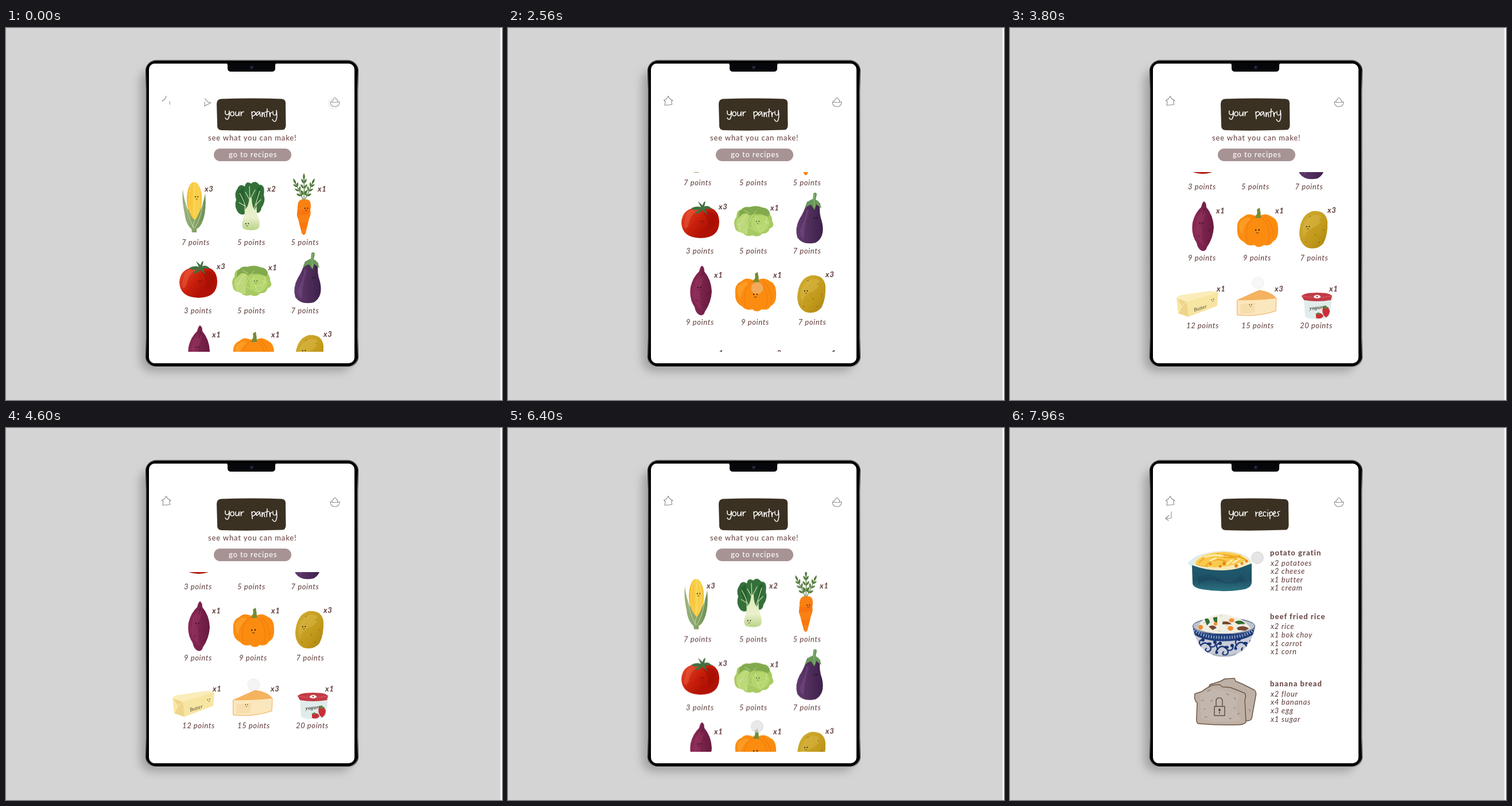
Write an HTML page that moves like this. It is 864 px wide and 648 px high and loops after 8000 ms.

```html
<!DOCTYPE html>
<html lang="en">
<head>
<meta charset="utf-8">
<title>Pantry app</title>
<style>
html, body { margin: 0; width: 100%; height: 100%; overflow: hidden; background: #d4d4d4; }
svg { display: block; width: 100%; height: 100%; }
text { font: 500 13px Lato, sans-serif; fill: #6b4a48; letter-spacing: .85px; }
.points text { font-style: italic; letter-spacing: .6px; }
.counts text { font: italic 800 13px Lato, sans-serif; letter-spacing: .9px; }
.title { font-weight: 800; letter-spacing: 1.05px; }
.items text { font-style: italic; letter-spacing: .72px; }
.script { font: italic 9px "Liberation Serif", serif; fill: #4a4136; letter-spacing: .2px; }
.line { fill: none; stroke-linecap: round; stroke-linejoin: round; }
.icon { stroke: #8b8b8b; stroke-width: 1.1; }
.hand { stroke: #fff; stroke-width: 1.5; }

.list, .cursor, .pantry, .recipes, .home, .hint { animation: 8s linear infinite; }
.list { animation-name: scroll; }
.cursor { animation-name: move; }
.pantry { animation-name: leave; }
.recipes { animation-name: enter; }
.home { animation-name: settle; }
.hint { animation-name: clear; }

@keyframes scroll {
  0%, 18.6% { transform: translateY(0); }
  21% { transform: translateY(-24px); }
  24% { transform: translateY(-70px); }
  27% { transform: translateY(-95px); }
  30%, 33.5% { transform: translateY(-104px); }
  38% { transform: translateY(-170px); }
  42% { transform: translateY(-207px); }
  46%, 64% { transform: translateY(-216px); }
  67.5% { transform: translateY(-179px); }
  70% { transform: translateY(-150px); }
  74% { transform: translateY(-115px); }
  77.5% { transform: translateY(-34px); }
  80% { transform: translateY(-5.5px); }
  83%, 100% { transform: translateY(0); }
}
@keyframes move {
  0% { transform: translate(571px, 131px); opacity: .28; }
  11% { transform: translate(569px, 137px); opacity: .28; animation-timing-function: ease-in-out; }
  17%, 18.6% { transform: translate(445px, 427px); opacity: .8; }
  21% { transform: translate(445px, 402px); opacity: .8; }
  24% { transform: translate(441px, 368px); opacity: .6; animation-timing-function: ease-in-out; }
  32%, 33.5% { transform: translate(434px, 453px); opacity: .4; }
  38% { transform: translate(433px, 387px); opacity: .75; animation-timing-function: ease-in-out; }
  47.5% { transform: translate(432px, 444px); opacity: .28; }
  64% { transform: translate(431px, 449px); opacity: .5; }
  67.5% { transform: translate(431px, 486px); opacity: .95; }
  71% { transform: translate(432px, 521px); opacity: .9; }
  80% { transform: translate(434px, 520px); opacity: .8; animation-timing-function: ease-in-out; }
  93.5% { transform: translate(431px, 226px); opacity: .5; }
  95%, 100% { transform: translate(431px, 226px); opacity: .95; }
}
@keyframes leave { 0%, 95% { opacity: 1; } 97.5%, 100% { opacity: 0; } }
@keyframes enter { 0%, 95% { opacity: 0; } 97.5%, 100% { opacity: 1; } }
@keyframes settle { 0% { opacity: 0; animation-timing-function: step-end; } .5%, 100% { opacity: 1; } }
@keyframes clear { 0% { opacity: 1; animation-timing-function: step-end; } .5%, 100% { opacity: 0; } }
</style>
</head>
<body>
<svg viewBox="0 0 864 648">
<defs>
  <clipPath id="window"><rect x="249" y="251" width="358" height="313"/></clipPath>
  <clipPath id="bowl"><path d="M318 345Q327 398 372 398T427 345Q424 359 372 359T318 345Z"/></clipPath>
  <filter id="soft" x="-20%" y="-20%" width="140%" height="140%"><feGaussianBlur stdDeviation="8"/></filter>
  <linearGradient id="metal" x2="0" y2="1">
    <stop stop-color="#777"/><stop offset=".03" stop-color="#222"/><stop offset=".1" stop-color="#999"/>
    <stop offset=".5" stop-color="#777"/><stop offset=".9" stop-color="#999"/>
    <stop offset=".97" stop-color="#222"/><stop offset="1" stop-color="#bbb"/>
  </linearGradient>
  <linearGradient id="kernel"><stop stop-color="#f3b62b"/><stop offset=".5" stop-color="#fbd24a"/><stop offset="1" stop-color="#f6c53a"/></linearGradient>
  <linearGradient id="husk"><stop stop-color="#9ab27c"/><stop offset=".5" stop-color="#86a468"/><stop offset="1" stop-color="#6c9153"/></linearGradient>
  <linearGradient id="bulb" x2="0" y2="1"><stop stop-color="#dcebb8"/><stop offset=".6" stop-color="#eaf0cd"/><stop offset="1" stop-color="#b9d385"/></linearGradient>
  <linearGradient id="tomato" x1=".1" y1=".2" x2=".7" y2=".6"><stop stop-color="#dd3f24"/><stop offset=".55" stop-color="#c91f0c"/><stop offset="1" stop-color="#b11205"/></linearGradient>
  <linearGradient id="aubergine"><stop stop-color="#603b70"/><stop offset=".4" stop-color="#54305f"/><stop offset="1" stop-color="#3c204b"/></linearGradient>
  <linearGradient id="yam"><stop stop-color="#8b2a56"/><stop offset="1" stop-color="#691b40"/></linearGradient>
  <linearGradient id="spud" x2="1" y2="1"><stop stop-color="#d2ae35"/><stop offset=".6" stop-color="#c29a1c"/><stop offset="1" stop-color="#a98310"/></linearGradient>
  <linearGradient id="dish" x2="0" y2="1"><stop stop-color="#1d5c6e"/><stop offset=".6" stop-color="#205167"/><stop offset="1" stop-color="#2b7381"/></linearGradient>
  <g id="face">
    <circle cx="-2.3" r=".9"/><circle cx="2.3" cy="-.3" r=".9"/>
    <path class="line" d="M-1.5 3.8Q0 5 1.5 3.6" stroke="#222" stroke-width=".7"/>
  </g>
  <g id="frond">
    <path class="line" d="M0 0Q1-16 0-32" stroke="#456c32" stroke-width="1.2"/>
    <path d="M0-8q-6 0-7-7q6 1 7 7q1-6 7-7q-1 7-7 7M0-17q-6-1-6-7q5 1 6 7q1-6 6-7q0 6-6 7M0-25q-5-1-5-7q5 1 5 7q0-6 5-7q0 6-5 7M0-30q-4-5 0-11q4 6 0 11" fill="#507a39"/>
  </g>
  <g id="sprig">
    <path class="line" d="M0 0q8-14 18-5q7 9-3 12q-6-2-2-6M3-3q-6-11 5-11M21-2q9 2 8-8" stroke="#1f3b7c" stroke-width="2.4"/>
    <g fill="#1a3474"><circle cx="7" cy="-14" r="3"/><circle cx="28" cy="-10" r="3"/><circle cx="1" cy="2" r="2.6"/><ellipse cx="18" cy="-7" rx="4" ry="2.4"/></g>
  </g>
  <path id="your" d="M382 144Q381 152 385 152T389 144Q390 154 387 160Q384 163 382 158M396 146Q391 145 391 150T395 154T396 146M400 146Q399 154 402 154T406 146L406 154M409 146L409.5 154Q409 146 414 146"/>
  <path id="home" d="M279 118.5Q277 124 271.5 126L274 128L273 134.5L285.5 133.5L284.8 127.8L287 126Q281.5 125 279 118.5Z"/>
</defs>

<rect width="864" height="648" fill="#d4d4d4"/>
<path d="M861.5 0h2.5v648h-2.5z" fill="#fff"/>

<!-- tablet -->
<rect x="234" y="72" width="368" height="526" rx="20" fill="#777" opacity=".55" filter="url(#soft)"/>
<rect x="243" y="55.5" width="371" height="536" rx="19" fill="url(#metal)"/>
<rect x="244.5" y="57" width="367.5" height="532.5" rx="17"/>
<rect x="249" y="62" width="358" height="522" rx="10" fill="#fff"/>
<path d="M383 61H472Q469 62 469 65V70Q469 76 463 76H392Q386 76 386 70V65Q386 62 383 61Z" fill="#06070b"/>
<circle cx="428" cy="68.5" r="3" fill="#191c2c"/><circle cx="428" cy="68.5" r="1.2" fill="#363e5c"/>

<!-- shared header -->
<g class="line icon">
  <use class="home" href="#home"/>
  <path class="hint" d="M279 118.5Q277 126 271.5 127M284.8 128L285.5 133M347 123Q350 130 357 130L346 136V129"/>
  <path d="M565 128.5Q573 131 581 128.5Q581 137 573 137T565 128.5M568 129Q567 126 570 125Q573 118 576 125Q579 126 577 129"/>
</g>

<g class="pantry">
  <path d="M375 123.5Q430 121.5 480 123.5Q488 124 487 133L487.5 170Q487 178.500 479 177.500Q425 179.500 375 178Q367 177 368 168L367 132Q367 124 375 123.500Z" fill="#3a3123"/>
  <g class="line hand" role="img" aria-label="your pantry" transform="translate(0 19) scale(1 .87)">
    <use href="#your"/>
    <path d="M428 146L429 160M428 149Q431 143 434 147T429 155M442 146Q436 145 436 151T442 147L443 155M446 147L446 156Q447 146 449.500 148L450.500 156M455 140L454 156M451 147L458 145M459 147L460 156Q460 147 463 147M465 145Q464 153 468 153T471 143Q473 157 470 164Q467 168 464 161"/>
  </g>
  <text x="352" y="196">see what you can make!</text>
  <rect x="362" y="210" width="135" height="22" rx="11" fill="#a89394"/>
  <text x="388" y="225" style="fill:#fff">go to recipes</text>

  <g clip-path="url(#window)"><g class="list">
    <!-- corn -->
    <path d="M308 281Q310 301 317 316L338 318Q344 305 347 288Q350 321 341 340Q337 348 332 350V356H324L323 350Q313 342 311 322Q306 301 308 281Z" fill="url(#husk)"/>
    <path d="M327 268.500C317 269 313 294 316 310Q320 327 329 335Q338 323 341 306C343 287 337 268 327 268.500Z" fill="url(#kernel)"/>
    <path class="line" d="M322 275Q316 300 322 322M328 272V328M334 276Q339 299 334 321" stroke="#fadf75" stroke-width="2" stroke-dasharray="4 3" opacity=".6"/>
    <path class="line" d="M313 308Q317 328 326 347M343 306Q339 332 329 348M329 336Q324 341 327 349" stroke="#bccca2" stroke-width="1.2"/>
    <use href="#face" x="332" y="294"/>
    <!-- bok choy -->
    <path d="M416 276Q407 270 403 280Q397 288 401 299Q397 311 404 321Q410 328 419 323L433 322Q444 324 445 313Q453 302 449 291Q452 272 441 273Q434 264 427 271Q418 265 416 276Z" fill="#34703a"/>
    <path d="M404 286Q408 300 418 320L414 277M444 276Q443 299 432 317L438 279" fill="#245d2d" opacity=".75"/>
    <path class="line" d="M426 325L424 276M421 325Q415 300 407 288M429 325Q437 300 442 284M425 300L417 286M426 297L434 282M434 309L444 299M416 310L406 304" stroke="#cfe1b0" stroke-width="1.2"/>
    <path d="M417 316Q422 312 424 296H428Q428 310 433 317Q436 312 437 303Q435 321 440 331Q445 349 436 351Q425 354 414 350Q409 345 413 333Q418 324 414 305Z" fill="url(#bulb)"/>
    <use href="#face" x="420" y="341"/>
    <!-- carrot -->
    <use href="#frond" transform="translate(519 299) scale(.95 1.13)"/>
    <use href="#frond" transform="translate(518 300) rotate(-25) scale(.9 1.02)"/>
    <use href="#frond" transform="translate(520 300) rotate(25) scale(.9 1.02)"/>
    <path d="M509 304Q513 297 519 299Q527 297 530 303Q532 310 530 317Q532 324 528 332L522 357Q519 364 515 357L509 333Q505 325 508 319Q507 311 509 304Z" fill="#f98114"/>
    <path d="M507 316Q519 320 530 312L529 323Q517 328 508 325ZM510 338Q520 342 526 336L522 350H514Z" fill="#fb6f0a" opacity=".65"/>
    <use href="#face" x="523" y="314"/>
    <!-- tomato -->
    <path d="M337 416Q367 414 368 441Q368 470 335 470Q303 469 302 443Q303 416 337 416Z" fill="url(#tomato)"/>
    <path d="M312 426Q321 417 334 421Q317 428 315 446Q310 459 306 448Z" fill="#ea6244" opacity=".45"/>
    <path d="M340 425Q352 440 347 460L361 447Q367 428 352 423Z" fill="#a30f04" opacity=".6"/>
    <path d="M336 416L331 406L339 413Q340 407 344 406L342 415Q349 412 355 419L343 419L348 430L338 421Q332 430 326 426L333 420Q324 423 319 418Q328 413 336 416Z" fill="#42703f"/>
    <use href="#face" x="338" y="441" opacity=".65"/>
    <!-- cabbage -->
    <path d="M395 450Q392 440 398 433Q398 421 407 420Q411 414 421 416Q433 412 444 417Q455 418 456 428Q461 434 460 440Q466 450 456 453Q453 463 443 462Q436 470 426 465Q414 469 409 460Q396 460 395 450Z" fill="#a8ca62"/>
    <path d="M403 424Q410 414 421 416Q433 412 444 417Q455 418 456 428L453 433Q431 420 401 440Z" fill="#82aa4d"/>
    <path d="M398 440Q411 420 421 431Q414 449 417 463Q395 462 398 440Z" fill="#bdd878"/>
    <path d="M424 436Q447 422 455 440Q456 456 440 461Q421 459 424 436Z" fill="#b5d66d"/>
    <path class="line" d="M403 457Q403 440 417 429M415 463Q416 440 432 423M440 461Q430 444 431 430M440 459Q452 450 451 432M400 447L411 442M418 450L427 455M434 451L445 447M446 440L455 445M412 422L421 427" stroke="#d8e8a8" stroke-width=".8"/>
    <use href="#face" x="435" y="441" opacity=".7"/>
    <!-- aubergine -->
    <path d="M521 407Q534 400 544 410Q541 425 547 442Q553 468 536 478Q514 483 504 469Q499 453 508 436Q516 424 521 407Z" fill="url(#aubergine)"/>
    <path d="M520 420Q519 434 511 450Q505 463 515 472Q517 443 524 422Z" fill="#865b93" opacity=".35"/>
    <path d="M532 392Q536 389 538 393L536 403Q543 405 546 418Q540 414 537 411L534 421L528 412Q521 413 517 419Q519 405 531 402Z" fill="#689958"/>
    <path class="line" d="M534 393Q532 404 534 416" stroke="#8bb578" stroke-width="1.4"/>
    <use href="#face" x="536" y="435"/>
    <!-- sweet potato -->
    <path d="M338 518Q342 520 342 528Q354 542 355 563Q354 582 343 598Q341 606 334 604Q327 601 325 590Q315 576 318 555Q322 538 333 528Q335 519 338 518Z" fill="url(#yam)"/>
    <path d="M326 545Q340 525 340 541Q330 570 338 596Q326 588 322 568Z" fill="#a14069" opacity=".35"/>
    <path class="line" d="M339 530L336 540M345 570L349 566M327 577L331 580M343 588L346 586" stroke="#551334"/>
    <use href="#face" x="333" y="556"/>
    <!-- pumpkin -->
    <path d="M427 543Q414 537 407 545Q394 550 396 567Q395 583 408 589Q414 597 426 594Q433 601 442 594Q453 597 458 588Q468 583 467 566Q467 549 456 545Q446 537 435 543Q431 538 427 543Z" fill="#fb8c10"/>
    <path class="line" d="M427 545Q408 554 413 588M436 545Q456 557 450 590M444 544Q461 562 458 582" stroke="#f47a0b" stroke-width="2" opacity=".6"/>
    <path d="M402 552Q414 543 420 549Q405 560 405 577Q395 563 402 552Z" fill="#ffae40" opacity=".45"/>
    <path d="M427 547Q432 540 430 532L435 529Q437 538 437 547Z" fill="#738d38"/>
    <use href="#face" transform="translate(431 568) scale(1.25)"/>
    <!-- potato -->
    <path d="M527 535Q550 533 553 553Q554 576 546 591Q536 603 519 599Q504 592 504 572Q506 541 527 535Z" fill="url(#spud)"/>
    <path d="M514 553Q526 537 541 543Q547 555 528 564T514 585Q505 570 514 553Z" fill="#dfbf50" opacity=".4"/>
    <path class="line" d="M540 550h1M546 568h1M515 589h1M531 576h1M522 544h1M538 589h1" stroke="#846b18" stroke-width="1.5"/>
    <use href="#face" x="519" y="562"/>
    <!-- butter -->
    <path d="M290 687L295 682L350 674L363 676L361 700L311 719L293 713Z" fill="#f7e5a2"/>
    <path d="M290 687L295 682L350 674L363 676L308 693Z" fill="#fbedb9"/>
    <path d="M290 687L308 693L311 719L293 713L299 701Z" fill="#eed58a"/>
    <path class="line" d="M290 687L299 701L308 693M299 701L293 713" stroke="#fff2c2"/>
    <text class="script" transform="translate(321 710) rotate(-17)">Butter</text>
    <use href="#face" transform="translate(353 689) rotate(-14) scale(.8)"/>
    <!-- cheese -->
    <path d="M396 690L434 673Q456 676 464 687L463 709Q430 720 396 716Z" fill="#fbe7bd"/>
    <path d="M396 690L434 673Q456 676 464 687Q427 691 396 690Z" fill="#f5b35f"/>
    <path class="line" d="M396 690L434 673Q456 676 464 687L463 709Q430 720 396 716Z" stroke="#efaa58"/>
    <path d="M401 698L427 694L426 712L401 714Z" fill="#f7d8a2" opacity=".6"/>
    <use href="#face" transform="translate(419 698) scale(.8)"/>
    <!-- yogurt -->
    <path d="M512 687H561L557 717Q554 723 535 723T514 718Z" fill="#dfeceb"/>
    <path d="M508 683Q512 677 535 677T561 683L559 690Q535 694 512 690Z" fill="#c23b45"/>
    <path class="line" d="M508 683Q533 688 561 683" stroke="#dd6168"/>
    <ellipse cx="535" cy="684" rx="6" ry="3" fill="#fff"/><circle cx="535" cy="684" r="1.4" fill="#b93a42"/>
    <text class="script" transform="translate(522 707) rotate(-5)" style="font-weight:700">yogurt</text>
    <path d="M545 702Q556 701 557 709Q556 718 550 720Q542 714 545 702ZM533 714Q543 710 546 718Q542 724 533 721Z" fill="#c92e38"/>
    <path d="M543 703L549 699L556 704L550 705ZM532 714L538 711L540 716Z" fill="#60813d"/>

    <g class="counts">
      <text x="346" y="284.500">x3</text><text x="455" y="284.500">x2</text><text x="543" y="284.500">x1</text>
      <text x="367" y="419.500">x3</text><text x="457" y="421.500">x1</text>
      <text x="359" y="539">x1</text><text x="462" y="539">x1</text><text x="553" y="538">x3</text>
      <text x="360" y="675">x1</text><text x="461" y="675">x3</text><text x="556" y="675">x1</text>
    </g>
    <g class="points">
      <text x="306" y="378">7 points</text><text x="403" y="378">5 points</text><text x="496.500" y="378">5 points</text>
      <text x="310" y="497">3 points</text><text x="403" y="497">5 points</text><text x="496.500" y="497">7 points</text>
      <text x="310" y="621">9 points</text><text x="406" y="621">9 points</text><text x="505.500" y="621">7 points</text>
      <text x="307" y="739">12 points</text><text x="403" y="739">15 points</text><text x="505" y="739">20 points</text>
    </g>
  </g></g>
</g>

<g class="recipes">
  <path d="M375 123.500Q430 121.500 478 124Q486 124.500 485 133L485.500 170Q485 178.500 477 177.500Q425 179.500 375 178Q367 177 368 168L367 132Q367 124 375 123.500Z" fill="#3a3123"/>
  <g class="line hand" role="img" aria-label="your recipes" transform="translate(0 19) scale(1 .87)">
    <use href="#your"/>
    <path d="M428 146L428.500 155Q428 146 433 147M435 151Q440 149 438 146T434 150T440 154M446 147Q441 144 441 150T446 154M449 147V155M449 142V142.400M452 147L453 160M452 149Q455 143 457 148T453 154M459 151Q464 149 462 146T459 150T464 154M470 145Q464 146 467 149T466 155"/>
  </g>
  <path class="line icon" d="M281 146V157L271 157.500L277 152M271 157.500L276 161"/>

  <!-- gratin -->
  <path d="M309 236Q325 216 369 214Q413 215 421 233L416 246L325 248Z" fill="#dcedf0"/>
  <path d="M317 239Q368 258 421 236V268Q421 280 402 282Q370 287 335 281Q318 278 318 270Z" fill="url(#dish)"/>
  <path d="M327 260Q347 249 365 263T402 256L410 267Q383 275 362 267T329 274Z" fill="#174156" opacity=".4"/>
  <path d="M319 237Q328 216 370 215Q408 216 420 233Q405 247 370 248Q335 247 319 237Z" fill="#fae8b4"/>
  <path d="M323 234Q337 217 373 216Q400 217 413 230Q390 241 357 243Q335 241 323 234Z" fill="#f8ca4e"/>
  <path class="line" d="M330 234Q343 219 363 222Q388 219 394 229M342 239Q355 224 376 232M382 224Q407 222 413 233M361 219Q374 231 401 222M325 237Q332 241 345 241" stroke="#f0a31f" stroke-width="2"/>
  <path class="line" d="M339 225Q355 219 371 223M388 235L400 228M349 231L359 227M378 237L387 230" stroke="#fff0b5" stroke-width="2.600"/>
  <g fill="#e8821c"><circle cx="373" cy="236" r="3"/><circle cx="366" cy="241" r="2.400"/><circle cx="394" cy="240" r="3"/><circle cx="412" cy="232" r="2.500"/><circle cx="349" cy="237" r="2.400"/><circle cx="404" cy="236" r="2.400"/></g>

  <!-- rice bowl -->
  <ellipse cx="372.500" cy="345" rx="54" ry="14" fill="#bfc3cc" stroke="#2b3f68"/>
  <path d="M327 349Q331 333 348 329Q370 320 387 328Q407 331 419 349Q395 359 372 358Q343 358 327 349Z" fill="#f1eee2"/>
  <path class="line" d="M337 340l4-2M353 332l4 1M366 328l3-2M376 345l4-2M362 353l4 1M404 341l4 2M370 336l4 1" stroke="#d3d1c3" stroke-width="1.500"/>
  <path d="M339 333Q347 329 348 339L343 344ZM391 338Q402 332 410 341L397 342ZM354 330L361 329L361 339Q354 340 354 330Z" fill="#356b35"/>
  <path d="M346 346Q354 341 360 348L353 352ZM370 338Q380 335 386 342H370ZM395 348Q405 342 416 349L410 353L397 352Z" fill="#744b36"/>
  <g fill="#f28b2c"><circle cx="332" cy="347" r="4"/><circle cx="358" cy="341" r="3"/><ellipse cx="386" cy="335" rx="4.500" ry="3.500"/><ellipse cx="384" cy="349" rx="5" ry="4"/></g>
  <path d="M318 345Q327 398 372 398T427 345Q424 359 372 359T318 345Z" fill="#c9ccd6"/>
  <g clip-path="url(#bowl)">
    <path d="M318 346Q332 363 372 363T427 346" class="line" stroke="#203f7d" stroke-width="17"/>
    <path d="M318 349Q332 365 372 365T427 349" fill="none" stroke="#a9b6d2" stroke-width="5" stroke-dasharray="1.500 3"/>
    <use href="#sprig" x="329" y="383"/><use href="#sprig" x="359" y="389"/><use href="#sprig" x="392" y="382"/>
  </g>
  <path d="M351 392Q373 401 396 391L392 396Q372 401 354 396Z" fill="#a8adba"/>

  <!-- banana bread -->
  <g fill="#beb0a5" stroke="#6f5847" stroke-width="1.500" stroke-linejoin="round">
    <path d="M345 455L348 447Q358 444 367 441L374 437L391 436L393 441L405 446Q417 452 425 456Q430 460 428 467L421 506Q418 512 407 509Z"/>
    <path d="M322 463L334 459Q342 453 352 448L365 447L370 451L384 452L397 457L409 462Q412 467 409 474L411 512Q408 517 397 517Q364 518 328 515Q324 513 325 503L326 479Q320 473 322 463Z"/>
  </g>
  <path d="M331 465Q355 449 374 458L400 465L393 487L402 509Q356 517 333 504Z" fill="#cac0b8" opacity=".4"/>
  <path class="line" d="M334 475l3-1M340 503l3 1M391 470l2 2M396 499l3-2M344 459l5-3M382 506h3M350 476l2-2M377 463l4 2M417 490l1 3M338 490l2-1M390 487l2 1" stroke="#85787c" stroke-width="1.300"/>
  <path class="line" d="M356 485H374V501H356ZM359 485V476Q359 470 364.500 470T370 476V485M365 494V497" stroke="#5b514a" stroke-width="1.500"/>
  <circle cx="365" cy="491" r="2" fill="#4c443f"/>

  <text class="title" x="453" y="222">potato gratin</text>
  <text class="title" x="453" y="332.500">beef fried rice</text>
  <text class="title" x="453" y="450">banana bread</text>
  <g class="items">
    <text x="454" y="239.500">x2 potatoes</text><text x="454" y="254">x2 cheese</text><text x="454" y="268.500">x1 butter</text><text x="454" y="283">x1 cream</text>
    <text x="454" y="350">x2 rice</text><text x="454" y="364.500">x1 bok choy</text><text x="454" y="379.500">x1 carrot</text><text x="454" y="394">x1 corn</text>
    <text x="454" y="467.500">x2 flour</text><text x="454" y="482">x4 bananas</text><text x="454" y="497">x3 egg</text><text x="454" y="511.500">x1 sugar</text>
  </g>
</g>

<circle class="cursor" r="10.300" fill="#e0e0e0" fill-opacity=".88" stroke="#c4c4c4" stroke-width=".8"/>
</svg>
</body>
</html>
```
